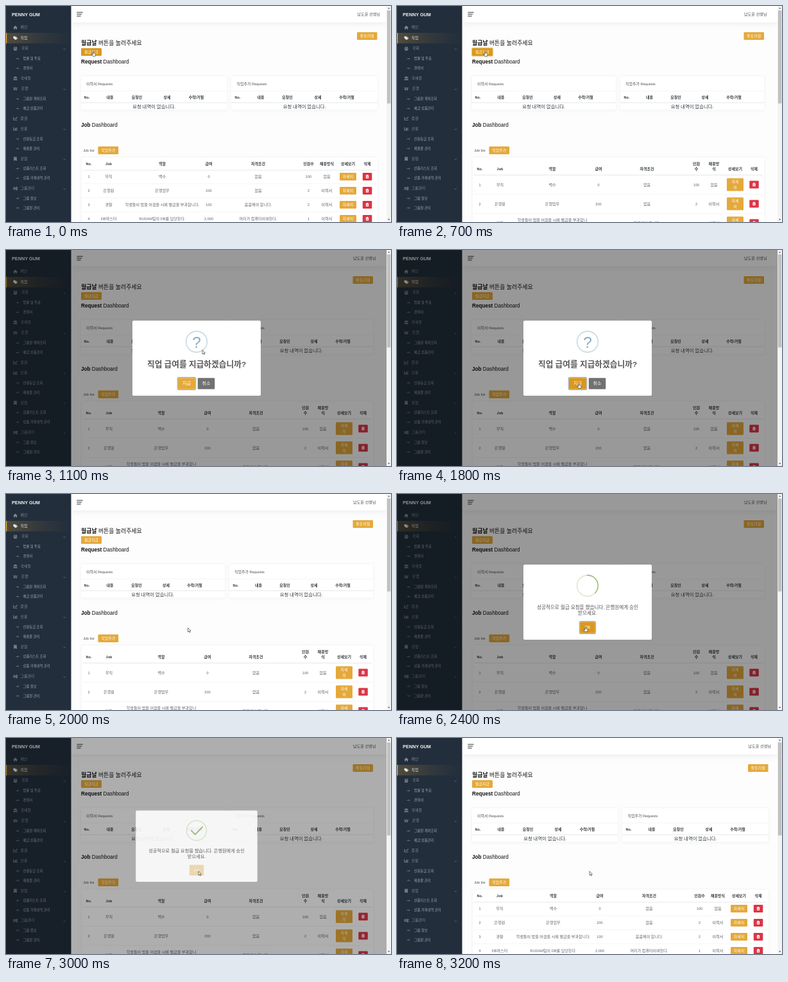
Animation, 600 px wide and 338 px high, one loop 3.3 s. Source, as an HTML page:

```html
<!DOCTYPE html>
<html lang="ko">
<head>
<meta charset="utf-8">
<title>Dashboard</title>
<style>
  html, body { margin: 0; width: 100%; height: 100%; overflow: hidden; background: #fff; }
  svg { display: block; width: 600px; height: 338px; }
  text { font-family: "Liberation Sans", "Noto Sans CJK KR", "Noto Sans CJK", "Noto Sans CJK JP", sans-serif; }
</style>
</head>
<body>
<svg id="stage" viewBox="0 0 600 338" xmlns="http://www.w3.org/2000/svg"></svg>
<script>
const LOOP = 3300, STEP = 100;
const GOLD = '#e5a93a', GOLD_DARK = '#d9981f', INK = '#212529', GREY = '#5b6168', GREEN = '#a0bd7a';
const CX = 297, CY = 169.3, ICON_Y = 143.5, RING = 16.4;

// Hangul is set a little larger so that each syllable is one em wide.
const spans = (s, size) => s.replace(/[가-힣]+/g,
  m => `<tspan font-size="${(size * 1.087).toFixed(2)}">${m}</tspan>`);

// y is the visual middle of the line
function text(x, y, s, size, fill = INK, { anchor = 'middle', bold = false, lead = '' } = {}) {
  const head = lead ? `<tspan font-weight="bold">${spans(lead, size)}</tspan>` : '';
  return `<text x="${x}" y="${y + size * 0.37}" font-size="${size}" fill="${fill}" ` +
    `text-anchor="${anchor}"${bold ? ' font-weight="bold"' : ''}>${head}${spans(s, size)}</text>`;
}
const left = { anchor: 'start' };
const rect = (x, y, w, h, fill, r = 0, more = '') =>
  `<rect x="${x}" y="${y}" width="${w}" height="${h}" rx="${r}" fill="${fill}" ${more}/>`;
const button = (x, y, w, h, label, size = 5.5, fill = GOLD) =>
  rect(x, y, w, h, fill, 1.2) + text(x + w / 2, y + h / 2, label, size, '#fff');
const hline = (x1, x2, y, color = '#e6e8ea', w = 0.5) =>
  `<path d="M${x1} ${y}H${x2}" stroke="${color}" stroke-width="${w}"/>`;

const ICONS = {
  home: 'M0 3.2L3.2 .3L6.4 3.2L5.6 3.4V6H3.9V4.1H2.5V6H.8V3.4Z',
  tags: 'M0 .6H2.8L5.6 3.4L3.2 5.9L0 2.9ZM3.6 .6H4.2L6.9 3.4L4.5 5.9L4 5.5L6 3.4Z',
  hall: 'M1 1.2A1 1 0 1 1 3 1.2A1 1 0 1 1 1 1.2M3.6 1.2A1 1 0 1 1 5.6 1.2A1 1 0 1 1 3.6 1.2M.2 2.8H6.2V4H.2ZM.9 4.5H5.5V6H.9Z',
  bank: 'M3.2 .2L6.3 1.7V2.2H.1V1.7ZM.9 2.6H1.8V4.8H.9ZM2.8 2.6H3.7V4.8H2.8ZM4.6 2.6H5.5V4.8H4.6ZM.1 5.1H6.3V6H.1Z',
  won: 'M0 .8H.9L1.7 4.2L2.7 .8H3.6L4.6 4.2L5.4 .8H6.3L5.1 5.5H4.1L3.15 2.4L2.2 5.5H1.2ZM0 2.4H6.3V3H0Z',
  chart: 'M0 .5H.7V5H6.4V5.7H0ZM1.2 3.8L2.7 1.9L3.8 2.9L5.2 1.2L4.7 .8H6.3V2.4L5.8 1.9L3.9 4L2.8 3L1.2 4.6Z',
  bars: 'M0 .5H.7V5H6.4V5.7H0ZM1.3 3H2.1V4.5H1.3ZM2.6 1.5H3.4V4.5H2.6ZM3.9 2.3H4.7V4.5H3.9ZM5.2 .9H6V4.5H5.2Z',
  shop: 'M.8 .2H5.4V6H3.7V4.7H2.5V6H.8ZM1.8 1.2V1.9H2.6V1.2ZM3.6 1.2V1.9H4.4V1.2ZM1.8 2.8V3.5H2.6V2.8ZM3.6 2.8V3.5H4.4V2.8Z'
};
const cog = (x, y, r) => `<circle cx="${x}" cy="${y}" r="${r}" fill="none" stroke="#868d96" stroke-width="1"/>` +
  `<circle cx="${x}" cy="${y}" r="${r + 0.7}" fill="none" stroke="#868d96" stroke-width=".6" stroke-dasharray=".8 .8"/>`;

const MENU = [
  [33.5, '메인', 'home'], [50, '직업', 'tags'], [66.5, '국회', 'hall', 1],
  [82.5, '법률 및 투표'], [97.5, '경위서'], [113, '국세청', 'bank'],
  [129.5, '은행', 'won', 1], [145.5, '그룹원 계좌조회'], [160.5, '예금 상품관리'],
  [176, '증권', 'chart'], [192, '신용', 'bars', 1], [208, '신용등급 조회'],
  [223, '제출물 관리'], [239, '상점', 'shop', 1], [254.5, '상품리스트 조회'],
  [269.5, '상품 거래내역 관리'], [285.5, '그룹관리', 'cogs', 1],
  [301, '그룹 정보'], [316, '그룹원 관리']
];

function sidebar() {
  let s = rect(0, 0, 101.5, 338, '#222e3c') + rect(0, 42, 101.5, 16.5, 'url(#active)') +
    rect(0, 42, 1.2, 16.5, GOLD) +
    text(9, 13, 'PENNY GUM', 7.27, '#f2f4f6', { anchor: 'start', bold: true });
  for (const [y, label, icon, open] of MENU) {
    if (!icon) {
      s += `<path d="M15.2 ${y}H19.8M18.4 ${y - 1.2}L19.8 ${y}L18.4 ${y + 1.2}" fill="none" stroke="#8f969e" stroke-width=".55"/>` +
        text(26.5, y, label, 4.92, '#a3a9b0', left);
      continue;
    }
    const color = label === '직업' ? '#e9ecef' : '#868d96';
    s += icon === 'cogs' ? cog(13.2, y, 1.4) + cog(16.7, y - 1.3, 0.7) + cog(16.7, y + 1.5, 0.7)
      : `<path transform="translate(11.3 ${y - 3})" d="${ICONS[icon]}" fill="${color}" fill-rule="evenodd"/>`;
    s += text(label === '국회' || label === '은행' ? 23.8 : 22.6, y, label, 5.4, color, left);
    if (open) s += `<path d="M89.6 ${y + 0.2}L91.2 ${y + 1.8}L92.8 ${y + 0.2}" fill="none" stroke="#868d96" stroke-width=".6"/>`;
  }
  return s;
}

const REQUEST_HEAD = ['No.', '내용', '요청인', '상세', '수락/거절'];
const JOB_HEAD = ['No.', 'Job', '역할', '급여', '자격조건', '인원수', '채용방식', '상세보기', '삭제'];
const JOBS = [
  ['1', '무직', '백수', '0', '없음', '100', '없음'],
  ['2', '은행원', '은행업무', '200', '없음', '2', '이력서'],
  ['3', '경찰', '학생들이 법을 어겼을 시에 벌금을 부과합니다.', '100', '꼼꼼해야 합니다.', '2', '이력서'],
  ['4', 'DB마스터', 'RUDAM팀의 DB를 담당한다.', '2,000', '머리가 컴퓨터이여한다.', '1', '이력서']
];

const WIDE = {
  right: 578.5, user: 583, cards: [[117, 227, 230.5], [351.5, 227, 465]],
  cols: [[126, 162, 204, 251, 296.5], [361, 397, 438.5, 486, 531]],
  jobCols: [129, 160, 243.5, 316, 393, 471.5, 500, 533, 563],
  headY: 247, headEnd: 257, rowY: 267, pitch: 22, wrap: false
};
const NARROW = {
  right: 572, user: 576.5, cards: [[117, 224, 228.5], [348, 224, 460]],
  cols: [[126, 162, 203.5, 249.5, 294], [358, 393.5, 434.5, 480, 525]],
  jobCols: [129, 160.5, 242, 314, 389.5, 466.5, 494, 527, 556.5],
  headY: 255, headEnd: 264.5, rowY: 279.5, pitch: 30, wrap: true
};

function requestCard(L, i) {
  const [x, w, mid] = L.cards[i];
  let s = rect(x, 110, w, 53.5, '#fff', 1.6, 'filter="url(#soft)"') +
    text(x + 8, 122, ['이력서', '직업추가'][i] + ' Requests', 5.5, '#495057', left) +
    hline(x, x + w, 133) + hline(x, x + w, 151.3, '#dfe2e5', 0.8) + hline(x, x + w, 162.8);
  REQUEST_HEAD.forEach((h, k) => s += text(L.cols[i][k], 142.5, h, 5.5, '#33383d', { bold: true }));
  return s + text(mid, 157, '요청 내역이 없습니다.', 6.8, '#343a40');
}

function trash(x, y) {
  return rect(x - 7.2, y - 6, 14.5, 12, '#dc3545', 1.2) +
    rect(x - 2.1, y - 2.3, 4.2, 5, '#fff', 0.6) + rect(x - 1, y - 3, 2, 1, '#fff', 0.3) +
    [-0.7, 0.6, 1.7].map(d => hline(x - 1.1, x + 1.1, y + d, '#dc3545', 0.5)).join('');
}

function jobTable(L) {
  const c = L.jobCols;
  let s = rect(118, 237.5, L.right - 118, 120, '#fff', 1.6, 'filter="url(#soft)"');
  JOB_HEAD.forEach((h, k) => {
    const bold = { bold: true };
    const cut = L.wrap && (k === 5 || k === 6) ? h.length - 1 : 0;
    s += cut
      ? text(c[k], 247, h.slice(0, cut), 5.6, '#33383d', bold) + text(c[k], 255, h.slice(cut), 5.6, '#33383d', bold)
      : text(c[k], L.headY, h, 5.5, '#33383d', bold);
  });
  s += hline(120, L.right - 2, L.headEnd, '#dfe2e5', 0.8);
  JOBS.forEach((row, r) => {
    const y = L.rowY + r * L.pitch;
    if (y > 350) return;
    row.forEach((cell, k) => {
      if (L.wrap && cell.length > 20) {
        s += text(c[k], y - 4.5, cell.slice(0, -2), 5.6, GREY) + text(c[k], y + 4.5, cell.slice(-2), 5.6, GREY);
      } else s += text(c[k], y, cell, 5.6, GREY);
    });
    s += L.wrap
      ? rect(c[7] - 13, y - 10, 26, 20, GOLD, 1.2) + text(c[7], y - 4.6, '자세', 5.4, '#fff') + text(c[7], y + 4.4, '히', 5.4, '#fff')
      : button(c[7] - 13, y - 6, 26, 12, '자세히');
    s += trash(c[8], y) + hline(120, L.right - 2, y + L.pitch / 2);
  });
  return s;
}

const page = L =>
  text(L.user, 12.4, '남도윤 선생님', 5.7, '#495057', { anchor: 'end' }) +
  button(L.right - 31.5, 41, 31.5, 12, '튜토리얼') +
  requestCard(L, 0) + requestCard(L, 1) + jobTable(L);

const base =
  rect(0, 0, 600, 338, '#fdfdfd') +
  rect(101, 0, 492, 25.5, '#fff', 0, 'filter="url(#bar)"') +
  [[10, 9.4], [12.9, 7.8], [15.8, 6.3]].map(([y, w]) => hline(110.3, 110.3 + w, y, '#495057', 1.2)).join('') +
  text(117, 57.5, ' 버튼을 눌러주세요', 8.2, '#111', { anchor: 'start', lead: '월급날' }) +
  text(117, 87.4, ' Dashboard', 8.2, '#111', { anchor: 'start', lead: 'Request' }) +
  text(117, 186.4, ' Dashboard', 8.2, '#111', { anchor: 'start', lead: 'Job' }) +
  text(120.3, 225.6, 'Job list', 5.5, '#495057', left) +
  button(143.5, 219.7, 31.7, 12.2, '직업추가') +
  rect(116.4, 65.4, 33.2, 13.2, 'none', 1.6, `id="payRing" stroke="${GOLD}" stroke-opacity=".5" stroke-width="1.25"`) +
  `<g id="pay">${button(117, 66, 32, 12, '월급지급')}</g>`;

const scrollbar = rect(593.2, 0, 6.8, 338, '#f3f3f3') + rect(593.8, 7, 5.5, 145.5, '#c1c1c1') +
  '<path d="M595 4.3L596.6 2.4L598.2 4.3Z" fill="#505050"/><path d="M595 333.3L596.6 335.2L598.2 333.3Z" fill="#505050"/>';

const focusRing = (x, y, w, h) => rect(x - 0.8, y - 0.8, w + 1.6, h + 1.6, 'none', 2,
  'class="focus" stroke="#9aabbd" stroke-width="1.1"');
const box = rect(CX - 100, 110.5, 200, 117.5, '#fff', 2);

const ask = box +
  `<circle cx="${CX}" cy="${ICON_Y}" r="${RING}" fill="none" stroke="#c9dae1" stroke-width="1.56"/>` +
  text(CX, ICON_Y + 0.2, '?', 24.5, '#87adbd') +
  text(CX, 178.7, '직업 급여를 지급하겠습니까?', 11.7, '#595959', { bold: true }) +
  `<g class="actions">${button(268, 200.2, 27, 17.6, '지급', 6.6)}${focusRing(268, 200.2, 27, 17.6)}` +
  `${button(298.8, 200.2, 26.5, 17.6, '취소', 6.6, '#717171')}</g>`;

const done = box +
  `<circle cx="${CX}" cy="${ICON_Y}" r="${RING}" fill="none" stroke="${GREEN}" stroke-opacity=".35" stroke-width="1.56"/>` +
  `<path id="arc" fill="none" stroke="${GREEN}" stroke-width="1.56"/>` +
  `<path id="tick" d="M288.3 143.6L294.6 150L306.8 137.4" pathLength="1" stroke-dasharray="1 2" fill="none" stroke="${GREEN}" stroke-width="1.95" stroke-linecap="round" stroke-linejoin="round"/>` +
  text(CX, 177, '성공적으로 월급 요청을 했습니다. 은행원에게 승인', 6.97, '#545454') +
  text(CX, 186.5, '받으세요.', 6.97, '#545454') +
  `<g class="actions">${button(285.2, 200.2, 23.6, 17.6, 'OK', 6.6)}${focusRing(285.2, 200.2, 23.6, 17.6)}</g>`;

const pointer = '<path d="M0 0V6.3L1.5 5L2.5 7.2L3.5 6.7L2.5 4.6H4.5Z" fill="#fff" stroke="#222" stroke-width=".6"/>';
const hand = '<path d="M-.7 .6Q0 -.4 .7 .6V2.8L3 3.3Q3.9 3.6 3.7 4.6L3.1 7.6H-.7L-2.6 4.7Q-2.3 3.8 -1.4 4.4L-.7 5Z" fill="#fff" stroke="#222" stroke-width=".6"/>';

const stage = document.getElementById('stage');
stage.innerHTML = `<defs>
  <linearGradient id="active"><stop offset="0" stop-color="${GOLD}" stop-opacity=".24"/>
    <stop offset=".5" stop-color="${GOLD}" stop-opacity=".09"/><stop offset="1" stop-color="${GOLD}" stop-opacity="0"/></linearGradient>
  <filter id="bar" x="-10%" y="-100%" width="120%" height="300%"><feDropShadow dx="0" dy="0" stdDeviation="6" flood-color="${INK}" flood-opacity=".1"/></filter>
  <filter id="soft" x="-10%" y="-30%" width="120%" height="160%"><feDropShadow dx="0" dy="0" stdDeviation="2.4" flood-color="${INK}" flood-opacity=".055"/></filter>
  </defs>${base}<g id="wide">${page(WIDE)}</g><g id="narrow">${page(NARROW)}</g>${sidebar()}
  ${rect(0, 0, 593.2, 338, '#000', 0, 'id="shade"')}${scrollbar}
  <g id="ask">${ask}</g><g id="done">${done}</g>
  <g id="pointer">${pointer}</g><g id="hand">${hand}</g>`;

const $ = id => document.getElementById(id);
const clamp = v => Math.min(1, Math.max(0, v));
const show = (el, on) => el.style.display = on ? '' : 'none';

function bezier(x1, y1, x2, y2) {
  const at = (a, b, u) => 3 * a * u * (1 - u) ** 2 + 3 * b * u * u * (1 - u) + u ** 3;
  return v => {
    v = clamp(v);
    let lo = 0, hi = 1;
    for (let i = 0; i < 24; i++) {
      const m = (lo + hi) / 2;
      if (at(x1, x2, m) < v) lo = m; else hi = m;
    }
    return v === 0 || v === 1 ? v : at(y1, y2, lo);
  };
}
const ease = bezier(0.25, 0.1, 0.25, 1), easeIn = bezier(0.42, 0, 1, 1);

// value of [time, ...numbers] keys at time t
function keyed(keys, t, curve) {
  const i = Math.max(1, keys.findIndex(k => k[0] >= t));
  const [t0, ...a] = keys[i - 1], [t1, ...b] = keys[i];
  const u = curve((t - t0) / (t1 - t0));
  return a.map((v, k) => v + (b[k] - v) * u);
}

const POP = [[0, 0.7], [135, 1.05], [240, 0.95], [300, 1]];
const DIALOGS = [{ id: 'ask', from: 740, to: 1840 }, { id: 'done', from: 2020, to: 2984 }];
const PATH = [[0, 136, 71], [600, 137.5, 71], [800, 137.5, 71], [1100, 306, 156.5], [1500, 283.5, 208],
  [1900, 283.5, 209], [2000, 283.5, 209.5], [2400, 293.5, 208], [2700, 300, 208.5], [LOOP, 300, 208.5]];
const smooth = u => u * u * (3 - 2 * u);

function drawIcon(t) {
  const u = easeIn((t / 4250 - 0.05) / 0.07);
  const a = -45 + 360 * Math.max(0, u - 0.5), b = -45 + 360 * Math.min(u, 0.5);
  const pt = d => {
    const r = d * Math.PI / 180;
    return `${CX + RING * Math.cos(r)} ${ICON_Y - RING * Math.sin(r)}`;
  };
  $('arc').setAttribute('d', b - a > 0.5 ? `M${pt(a)}A${RING} ${RING} 0 0 0 ${pt(b)}` : '');
  const p = clamp((t / 750 - 0.54) / 0.3);
  show($('tick'), p > 0);
  $('tick').setAttribute('stroke-dashoffset', 1 - p);
}

function draw(t) {
  const narrow = t >= 700 && t < 3130;
  show($('wide'), !narrow);
  show($('narrow'), narrow);
  show($('payRing'), t >= 600 && t < 740);
  $('pay').firstChild.setAttribute('fill', t < 740 ? GOLD_DARK : GOLD);

  const over = t < 740 || (t >= 1450 && t < 1840) || (t >= 2350 && t < 2984);
  let shade = 0;
  for (const { id, from, to } of DIALOGS) {
    const el = $(id), on = t >= from && t < to + 150;
    show(el, on);
    shade += 0.4 * (ease((t - from) / 100) - ease((t - to) / 100));
    if (!on) continue;
    const out = ease((t - to) / 150);
    const k = keyed(POP, Math.min(300, t - from), ease)[0] * (1 - out / 2);
    el.setAttribute('transform', `translate(${CX} ${CY}) scale(${k}) translate(${-CX} ${-CY})`);
    el.setAttribute('opacity', 1 - out);
    // buttons are disabled while the dialog closes
    const actions = el.querySelector('.actions');
    actions.setAttribute('opacity', t < to ? 1 : 0.4);
    actions.firstChild.setAttribute('fill', over ? GOLD_DARK : GOLD);
    show(el.querySelector('.focus'), t < to);
    if (id === 'done') drawIcon(t - from);
  }
  $('shade').setAttribute('opacity', shade);

  const [x, y] = keyed(PATH, t, smooth);
  for (const id of ['pointer', 'hand']) {
    $(id).setAttribute('transform', `translate(${x} ${y})`);
    show($(id), (id === 'hand') === over);
  }
}

// the picture changes ten times a second
const start = performance.now();
function tick() {
  const t = (performance.now() - start) % LOOP;
  draw(Math.floor(t / STEP) * STEP);
  requestAnimationFrame(tick);
}
tick();
</script>
</body>
</html>
```
